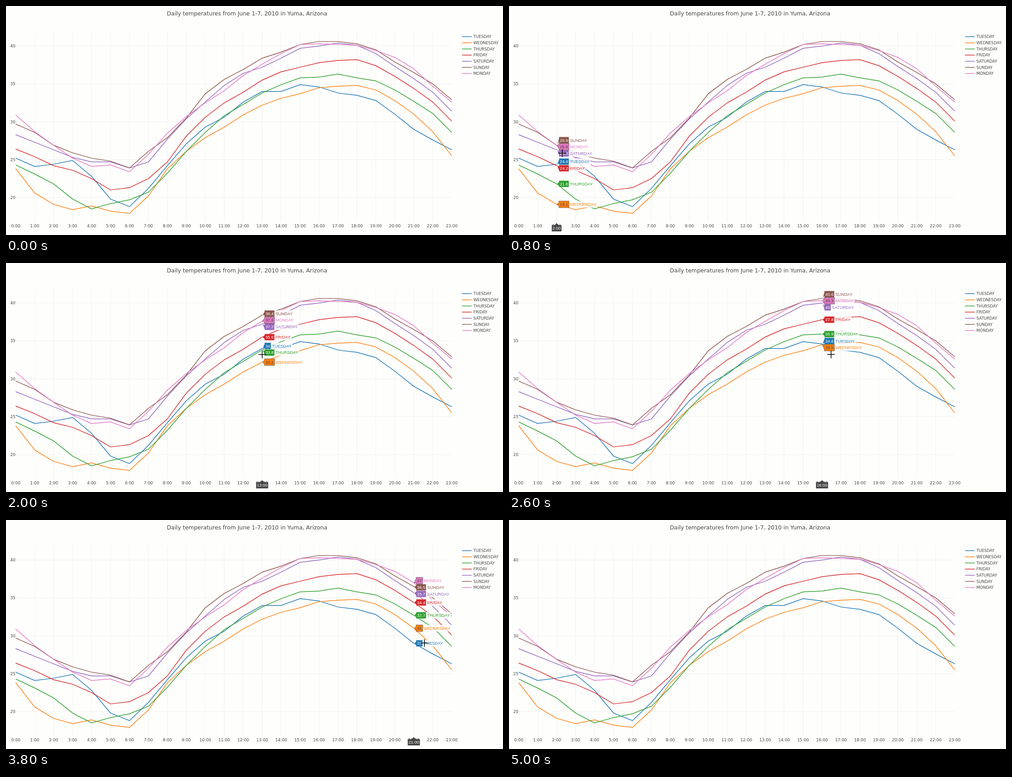
Write an HTML page that moves like this. It is 1100 by 509 pixels and loops after 5.2 s.

```html
<!DOCTYPE html>
<html lang="en">
<head>
<meta charset="utf-8">
<title>Daily temperatures</title>
<style>
html, body { margin: 0; width: 100%; height: 100%; overflow: hidden; background: #fefefd; }
svg { display: block; width: 1100px; height: 509px; }
text { font-family: "DejaVu Sans", Verdana, sans-serif; font-size: 8.8px; fill: #444; }
#hover text { font-family: "Liberation Sans", Arial, sans-serif; font-size: 9.3px; }
</style>
</head>
<body>
<svg viewBox="0 0 1100 509"><g id="chart"></g><g id="hover"></g></svg>
<script>
const series = [
  { name: "TUESDAY", color: "#1f77b4", ink: "#fff", temps: [25.2, 24.1, 24.4, 24.9, 22.8, 19.8, 18.8, 21.2,
    24.2, 27.1, 29.3, 30.6, 32.6, 34, 34, 34.9, 34.6, 33.8, 33.5, 32.8, 31, 29, 27.6, 26.3] },
  { name: "WEDNESDAY", color: "#ff7f0e", ink: "#444", temps: [23.8, 20.6, 19.1, 18.4, 18.9, 18.2, 17.9, 20.2,
    23.8, 26.1, 27.9, 29.3, 30.9, 32.2, 33.1, 33.7, 34.5, 34.7, 34.8, 34.2, 32.8, 31, 28.7, 25.5] },
  { name: "THURSDAY", color: "#2ca02c", ink: "#fff", temps: [24.3, 23.1, 21.8, 19.8, 18.5, 19.2, 19.7, 20.7,
    23.2, 26.1, 28.6, 30.8, 32.3, 33.8, 34.9, 35.8, 35.9, 36.3, 35.8, 35.4, 34.2, 32.7, 31.1, 28.6] },
  { name: "FRIDAY", color: "#d62728", ink: "#fff", temps: [26.4, 25.4, 24.2, 23.6, 22.5, 21, 21.3, 22.5,
    24.7, 28.1, 30.6, 32.5, 33.9, 35.5, 36.6, 37.2, 37.8, 38.1, 38.2, 37.4, 36, 34.4, 32.6, 30.1] },
  { name: "SATURDAY", color: "#9467bd", ink: "#fff", temps: [28.3, 27.3, 26.3, 25.3, 24.7, 24.7, 23.9, 24.7,
    27.7, 30.4, 32.6, 34.8, 36.4, 37.2, 38.4, 39.7, 40, 40.4, 40.1, 39, 37.3, 35.7, 33.9, 31.4] },
  { name: "SUNDAY", color: "#8c564b", ink: "#fff", temps: [29.7, 28.6, 26.9, 25.9, 25.2, 24.8, 23.9, 26.1,
    27.9, 30.5, 33.7, 35.6, 36.9, 38.4, 39.2, 40.2, 40.6, 40.6, 40.3, 39.5, 37.9, 36.5, 35, 32.9] },
  { name: "MONDAY", color: "#e377c2", ink: "#444", temps: [30.9, 28.7, 26.9, 25.2, 24.1, 24.3, 23.4, 25.7,
    28.5, 30.7, 32.5, 34.1, 36.1, 37.6, 39, 40.2, 40.3, 40.2, 40.1, 39.4, 38.5, 37, 34.7, 32.6] }
];

const LEFT = 21.5, RIGHT = 986.5, STEP = (RIGHT - LEFT) / 23;
const PAD = 2.1, ARROW = 4.3, ROW = 14.7;
const LOOP = 5200, TICK = 200;
// pointer path: time, x, y
const path = [[200, -26, 329], [800, 118, 327], [1400, 262, 321], [2000, 567, 203.5],
              [3000, 810, 203], [3800, 926, 273.5], [4600, 1042, 344]];

const px = hour => LEFT + hour * STEP;
const py = temp => 89 + (40 - temp) * 16.835;
const $ = id => document.getElementById(id);
const text = (x, y, s, attrs = "") => `<text x="${x}" y="${y}" ${attrs}>${s}</text>`;
const line = (d, color, width) =>
  `<path d="${d}" fill="none" stroke="${color}" stroke-width="${width}"/>`;

const ctx = document.createElement("canvas").getContext("2d");
ctx.font = '9.3px "Liberation Sans", Arial, sans-serif';
const widthOf = s => ctx.measureText(s).width;

function drawChart() {
  let out = text(533.5, 21.3, "Daily temperatures from June 1-7, 2010 in Yuma, Arizona",
    'text-anchor="middle" style="font-size:12.43px"');
  for (let h = 0; h < 24; h++) {
    if (h > 0 && h < 23) out += line(`M${px(h)} 57V480`, "#eee", 0.75);
    out += text(px(h), 492, h + ":00", 'text-anchor="middle" style="font-size:9px"');
  }
  for (let v = 20; v <= 40; v += 5) {
    out += line(`M${LEFT} ${py(v)}H${RIGHT}`, "#eee", 0.75);
    out += text(20.8, py(v) + 3.2, v, 'text-anchor="end"');
  }
  series.forEach((s, i) => {
    const y = 68.2 + i * 13.65;
    out += line("M" + s.temps.map((v, h) => px(h) + " " + py(v)).join("L"), s.color, 1.45);
    out += line(`M1009.3 ${y}h21.4`, s.color, 1.45);
    out += text(1034.5, y + 3.1, s.name, 'style="font-size:8.73px"');
  });
  $("chart").innerHTML = out;
}

// Spread overlapping labels evenly around the mean of their points.
function placeLabels(hour) {
  const groups = [];
  const labels = series.map(s => ({ s, value: s.temps[hour], y: py(s.temps[hour]) }));
  [...labels].sort((a, b) => a.y - b.y).forEach(label => {
    let group = [label];
    const top = g => g.reduce((sum, l) => sum + l.y, 0) / g.length - (g.length - 1) * ROW / 2;
    while (groups.length) {
      const last = groups[groups.length - 1];
      if (top(last) + last.length * ROW <= top(group)) break;
      group = groups.pop().concat(group);
    }
    groups.push(group);
    group.forEach((l, i) => l.at = top(group) + i * ROW);
  });
  return labels;
}

function drawLabel({ s, value, y, at }, x) {
  const w = widthOf(value) + 2 * PAD, box = x + ARROW, end = box + w;
  const top = at - ROW / 2, bottom = at + ROW / 2;
  return `<rect x="${end}" y="${top}" width="${widthOf(s.name) + 2 * PAD}" height="${ROW}" fill="#fff" fill-opacity=".8"/>` +
    `<path d="M${x} ${y}L${box} ${at + ARROW}V${bottom}H${end}V${top}H${box}V${at - ARROW}Z"
      fill="${s.color}" stroke="${s.ink}" stroke-width=".72"/>` +
    text(box + PAD, at + 3.3, value, `style="fill:${s.ink}"`) +
    text(end + PAD, at + 3.3, s.name, `style="fill:${s.color}"`);
}

function drawHover(x, y) {
  const hour = Math.floor((x - LEFT) / STEP + 0.01), hx = px(hour);
  const label = hour + ":00", half = widthOf(label) / 2 + PAD, tip = 482.3;
  return placeLabels(hour).map(l => drawLabel(l, hx + 0.8)).join("") +
    `<path d="M${hx} ${tip}l${ARROW} ${ARROW}H${hx + half}v${ROW}H${hx - half}v${-ROW}H${hx - ARROW}Z"
      fill="#444" stroke="#fff" stroke-width=".72"/>` +
    text(hx, 497.4, label, 'text-anchor="middle" style="fill:#fff"') +
    line(`M${x - 8.5} ${y}h17M${x} ${y - 8.5}v17`, "#000", 1.5);
}

function pointer(t) {
  const i = path.findIndex(p => p[0] > t);
  if (i < 1) return null;
  const [a, b] = [path[i - 1], path[i]], k = (t - a[0]) / (b[0] - a[0]);
  const x = a[1] + (b[1] - a[1]) * k, y = a[2] + (b[2] - a[2]) * k;
  return x >= LEFT && x <= RIGHT ? [x, y] : null;
}

const start = performance.now();
let shown = -1;
function frame() {
  const t = (performance.now() - start) % LOOP, tick = Math.floor(t / TICK);
  if (tick !== shown) {
    shown = tick;
    const at = pointer(tick * TICK);
    $("hover").innerHTML = at ? drawHover(...at) : "";
  }
  requestAnimationFrame(frame);
}
drawChart();
frame();
</script>
</body>
</html>
```
